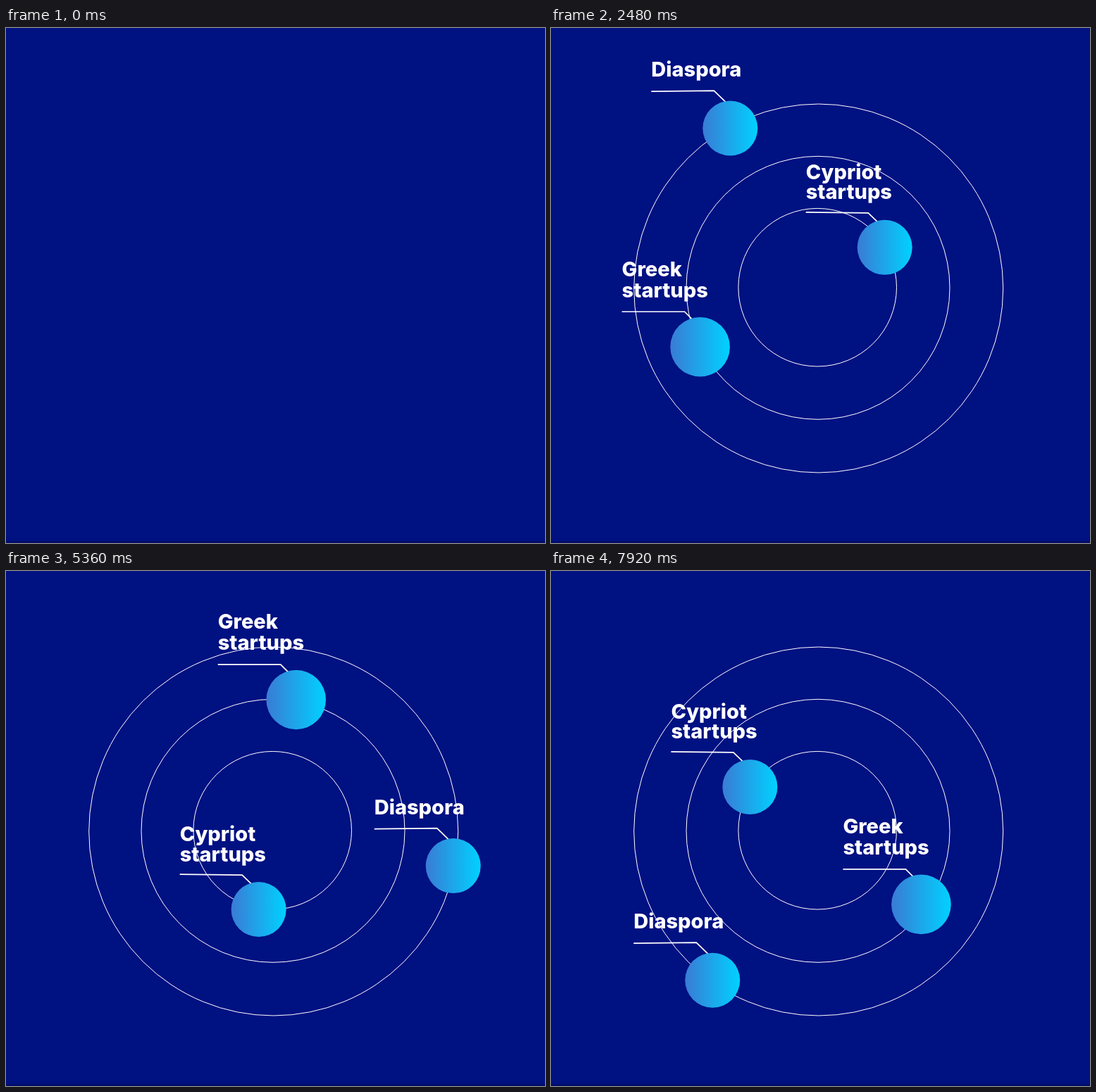
An HTML page with a canvas that plays this animation: 765 by 732 pixels, repeating every 8000 ms.

```html
<!DOCTYPE html>
<html lang="en">
<head>
<meta charset="utf-8">
<title>Orbits</title>
<style>
  html, body { margin: 0; width: 100%; height: 100%; overflow: hidden; background: #001182; }
  canvas { display: block; }
</style>
</head>
<body>
<canvas id="stage" width="765" height="732"></canvas>
<script>
const ctx = document.getElementById('stage').getContext('2d');
const LOOP = 8000, STEP = 80;

const rings = [[378.2, 368.7, 112.3], [379, 369.3, 187], [379.7, 370, 262]];

// start: angle in degrees at 1600 ms; lines: [text, baseline]; all offsets are from the disc centre
const planets = [
  { cx: 379.7, cy: 370, orbit: 259.7, start: 202, r: 39, left: -112,
    lines: [['Diaspora', -73.5]],
    leader: [[-112, -52.5], [-23, -53.5], [-5, -36]] },
  { cx: 375, cy: 365, orbit: 185.7, start: 112.5, r: 42.3, left: -111,
    lines: [['Greek', -100.5], ['startups', -70.5]],
    leader: [[-111, -50], [-22, -50], [-11, -39]] },
  { cx: 376.5, cy: 369.5, orbit: 113, start: 290.2, r: 39, left: -112,
    lines: [['Cypriot', -97], ['startups', -68.5]],
    leader: [[-112, -50], [-23.5, -49], [-10, -36]] }
];

// Shared rotation: time in ms, degrees turned
const turn = [[0, -72], [1600, 0], [2720, 49.8], [3280, 76.6], [3600, 89.9], [4000, 108.2],
  [4480, 130.6], [5360, 168.9], [6240, 209.5], [6800, 234], [7920, 283.4]];

function turned(t) {
  let i = 1;
  while (i < turn.length - 1 && t > turn[i][0]) i++;
  const [t0, a0] = turn[i - 1], [t1, a1] = turn[i];
  return a0 + (a1 - a0) * (t - t0) / (t1 - t0);
}

function circle(x, y, r) {
  ctx.beginPath();
  ctx.arc(x, y, r, 0, Math.PI * 2);
}

function drawPlanet(p, angle) {
  const a = (p.start + angle) * Math.PI / 180;
  ctx.save();
  ctx.translate(p.cx + p.orbit * Math.cos(a), p.cy + p.orbit * Math.sin(a));

  ctx.lineWidth = 1.7;
  ctx.beginPath();
  p.leader.forEach(([x, y]) => ctx.lineTo(x, y));
  ctx.stroke();

  const fill = ctx.createLinearGradient(-p.r, 0, p.r, 0);
  fill.addColorStop(0, '#3a7bd5');
  fill.addColorStop(1, '#00d2ff');
  ctx.fillStyle = fill;
  circle(0, 0, p.r);
  ctx.fill();

  ctx.fillStyle = '#fff';
  p.lines.forEach(([text, y]) => ctx.fillText(text, p.left, y));
  ctx.restore();
}

function draw(t) {
  ctx.globalAlpha = 1;
  ctx.fillStyle = '#001182';
  ctx.fillRect(0, 0, 765, 732);
  ctx.fillStyle = '#000d6b';
  ctx.fillRect(0, 729, 765, 3);

  ctx.globalAlpha = Math.min(1, Math.max(0, (t - 100) / 1020));
  ctx.strokeStyle = '#fff';
  ctx.lineWidth = 1;
  rings.forEach(([x, y, r]) => { circle(x, y, r); ctx.stroke(); });

  ctx.font = '800 29px Inter, Roboto, sans-serif';
  const angle = turned(t);
  planets.forEach(p => drawPlanet(p, angle));
}

const begin = performance.now();
function frame() {
  const t = (performance.now() - begin) % LOOP;
  draw(Math.floor(t / STEP) * STEP);
  requestAnimationFrame(frame);
}
frame();
</script>
</body>
</html>
```
